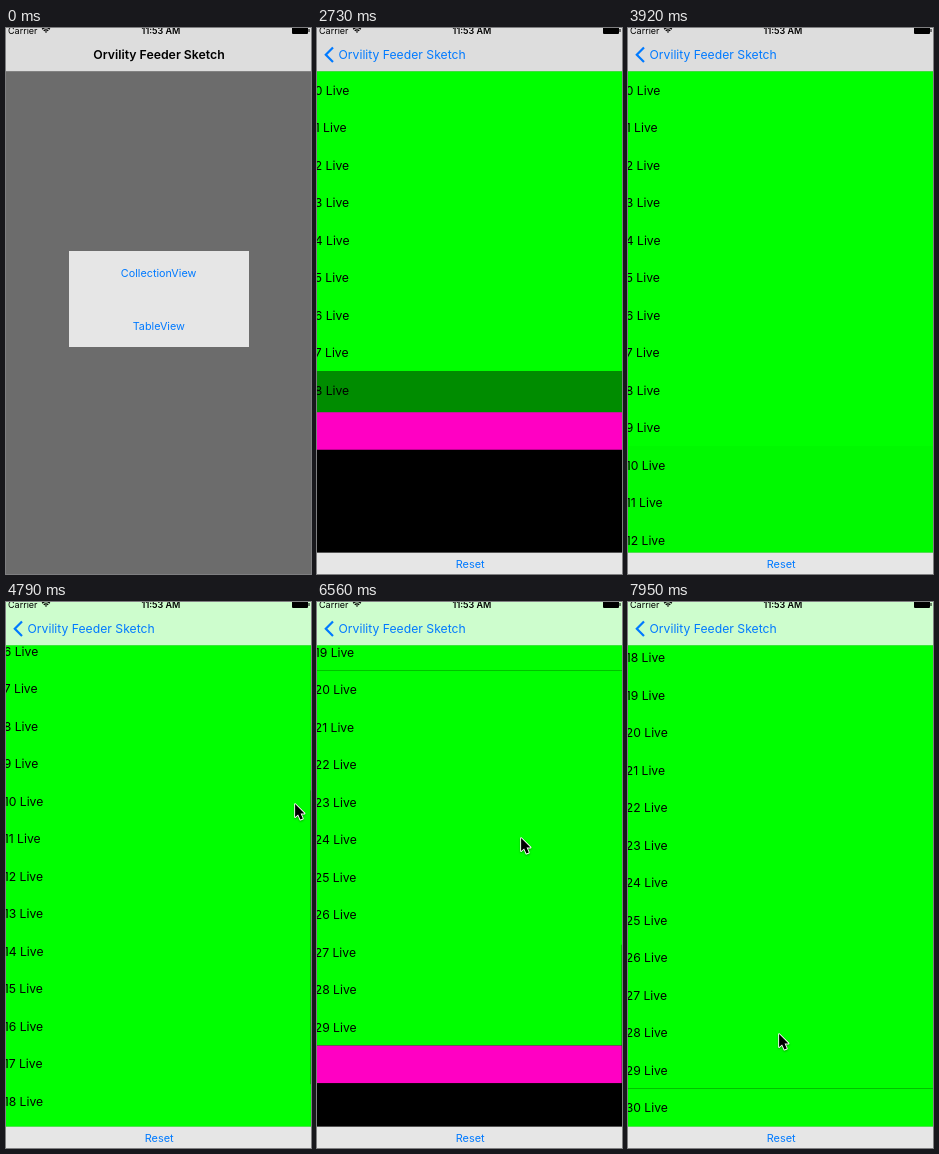
An HTML page with a canvas for the animation above (8 s loop, 305x546 px).

```html
<!DOCTYPE html>
<html lang="en">
<head>
<meta charset="utf-8">
<style>
  html, body { margin: 0; width: 100%; height: 100%; overflow: hidden; background: #000; }
  canvas { display: block; width: 305px; height: 546px; }
</style>
</head>
<body>
<canvas id="stage"></canvas>
<script>
const W = 305, H = 546, LOOP = 8000;
const TOP = 43, NAV = 43.3, BAR = 524.6, VIEW = 481, HAIRLINE = 0.3;
const ROW = 37.5, LEFT = -3.5, PANE = W + 10;
const BLUE = '#007aff', GREEN = '#00ff00', PINK = '#ff00c3';
const TITLE = 'Orvility Feeder Sketch';

const canvas = document.getElementById('stage');
const ctx = canvas.getContext('2d');
const ratio = window.devicePixelRatio || 1;
canvas.width = W * ratio;
canvas.height = H * ratio;

const clamp = v => Math.max(0, Math.min(1, v));
const mix = (a, b, p) => a + (b - a) * p;
const linear = p => p;
const smooth = p => p * p * (3 - 2 * p);
const easeIn = p => p * p;
const easeOut = p => 1 - (1 - p) ** 3;

// Keys are [time, values, easing used to arrive there].
function track(keys, t) {
  if (t <= keys[0][0]) return keys[0][1];
  for (let i = 1; i < keys.length; i++) {
    const [end, to, ease = smooth] = keys[i];
    const [start, from] = keys[i - 1];
    if (t < end) {
      const p = ease((t - start) / (end - start));
      return from.map((v, k) => mix(v, to[k], p));
    }
  }
  return keys[keys.length - 1][1];
}

const scrollKeys = [
  [4420, [0]],
  [4560, [55], easeIn],
  [4790, [238], linear],
  [5010, [338], easeOut],
  [5480, [306.5]],
  [5940, [306.5]],
  [6120, [400], easeIn],
  [6290, [610], linear],
  [6500, [725], easeOut],
  [7380, [681.5]]
];
const pointerKeys = [
  [960, [262, 400]],
  [1420, [164, 250]],
  [2120, [164, 250]],
  [4310, [291, 460]],
  [4420, [289, 440]],
  [4560, [289, 385], easeIn],
  [4790, [288, 201], linear],
  [4960, [284, 130], easeOut],
  [5120, [280, 130]],
  [5860, [214, 430]],
  [5940, [212, 430]],
  [6300, [203, 235]],
  [6740, [203, 235]],
  [7390, [160, 386]],
  [7560, [160, 386]],
  [7930, [150, 431]]
];
const loads = [[2570, 10], [3648, 20], [5880, 30], [7555, 40]];

function rect(x, y, w, h, color) {
  ctx.fillStyle = color;
  ctx.fillRect(x, y, w, h);
}

function text(str, x, y, size, color = '#000', align = 'left', weight = 400) {
  ctx.font = `${weight} ${size}px Inter, Roboto, sans-serif`;
  ctx.textAlign = align;
  ctx.fillStyle = color;
  ctx.fillText(str, x, y);
}

function faded(alpha, draw) {
  ctx.save();
  ctx.globalAlpha *= clamp(alpha);
  draw();
  ctx.restore();
}

function drawHome(t, push) {
  const shift = -94 * push;
  rect(0, TOP, W, H - TOP, '#6c6c6c');
  rect(63 + shift, 223, 180, 96, '#e6e6e6');
  const pressed = t > 1540;
  faded(pressed ? 0.27 : 1, () =>
    text('CollectionView', 152.6 + shift, 249, 10.8, BLUE, 'center'));
  text('TableView', 152.8 + shift, 301.5, 10.8, BLUE, 'center');
  rect(0, TOP, W, H - TOP, `rgba(0,0,0,${0.1 * push})`);
}

function drawList(t, x, scroll) {
  let settled = 8, total = 8, grow = 1;
  for (const [start, count] of loads) {
    if (t < start) break;
    settled = total;
    total = count;
    grow = smooth(clamp((t - start) / 300));
  }
  const top = TOP - scroll;
  const suffix = t < loads[0][0] ? ' Placeholder' : ' Live';

  rect(x, TOP, PANE, H - TOP, '#000');
  rect(x, top, PANE, settled * ROW, GREEN);
  faded(grow, () =>
    rect(x, top + settled * ROW, PANE, (total - settled) * ROW, GREEN));
  for (let i = 0; i < total; i++) {
    text(i + suffix, x + 1.2, top + i * ROW + 23.7, 12.2);
  }
  rect(x, top + mix(settled, total, grow) * ROW, PANE, ROW, PINK);
  drawIndicator(t, scroll, total);

  rect(x, BAR, PANE, H - BAR, '#e6e6e6');
  rect(x, BAR - HAIRLINE, PANE, HAIRLINE, 'rgba(0,0,0,.3)');
  text('Reset', x + 156.7, 540, 10.9, BLUE, 'center');
}

// The scroll mark gets shorter while the list is pulled past its end.
function drawIndicator(t, scroll, total) {
  const content = (total + 1) * ROW;
  const visible = Math.min(clamp((t - 4420) / 60), clamp((7390 - t) / 250));
  const excess = Math.max(0, scroll - (content - VIEW));
  const length = VIEW * VIEW / content - excess;
  const y = Math.min(TOP + scroll / content * VIEW, TOP + VIEW - length);
  faded(visible, () => rect(304, y, 1, length, 'rgba(0,0,0,.25)'));
}

function drawNav(push, scroll) {
  const tint = clamp(scroll / TOP);
  const side = mix(221, 205, tint), green = mix(221, 253, tint);
  rect(0, 0, W, NAV, `rgb(${side},${green},${side})`);
  rect(0, NAV, W, HAIRLINE, 'rgba(0,0,0,.3)');

  faded(1 - 2.4 * push, () =>
    text(TITLE, 153 - 50 * push, 31.2, 12.3, '#000', 'center', 600));
  faded((push - 0.35) / 0.65, () => {
    text(TITLE, mix(87, 21.5, push), 31.2, 12.2, BLUE);
    ctx.strokeStyle = BLUE;
    ctx.lineWidth = 2.2;
    ctx.beginPath();
    ctx.moveTo(16, 19.5);
    ctx.lineTo(8.8, 26.8);
    ctx.lineTo(16, 34.1);
    ctx.stroke();
  });
  drawStatus();
}

function drawStatus() {
  text('Carrier', 2, 6, 9);
  text('11:53 AM', 155, 6, 9, '#000', 'center', 600);
  ctx.strokeStyle = '#000';
  ctx.lineWidth = 1.3;
  for (const r of [1, 3.2, 5.4]) {
    ctx.beginPath();
    ctx.arc(40, 5, r, -Math.PI * 0.75, -Math.PI * 0.25);
    ctx.stroke();
  }
  ctx.fillStyle = '#000';
  ctx.beginPath();
  ctx.roundRect(286, -1, 16, 7, 1);
  ctx.fill();
  rect(302.5, 1, 1, 3, '#000');
}

function drawPointer(t) {
  if (t < 960 || (t > 2120 && t < 4310)) return;
  const [x, y] = track(pointerKeys, t);
  ctx.save();
  ctx.translate(x + 0.6, y + 0.6);
  ctx.beginPath();
  [[0.5, 0.5], [0.5, 13.5], [3.5, 10.8], [5.8, 16], [8.2, 15], [6, 9.9], [9.9, 9.9]]
    .forEach(point => ctx.lineTo(...point));
  ctx.closePath();
  ctx.shadowColor = 'rgba(0,0,0,.35)';
  ctx.shadowBlur = 2 * ratio;
  ctx.shadowOffsetY = ratio;
  ctx.lineWidth = 1.8;
  ctx.lineJoin = 'round';
  ctx.strokeStyle = '#fff';
  ctx.stroke();
  ctx.shadowColor = 'transparent';
  ctx.fillStyle = '#000';
  ctx.fill();
  ctx.restore();
}

// Critically damped spring for the screen change.
function pushProgress(t) {
  const s = Math.max(0, t - 1620) * 0.0182;
  return t > 2110 ? 1 : 1 - (1 + s) * Math.exp(-s);
}

function render(now) {
  const t = now % LOOP;
  const push = pushProgress(t);
  const [scroll] = track(scrollKeys, t);
  ctx.setTransform(ratio, 0, 0, ratio, 0, 0);
  if (push < 1) drawHome(t, push);
  if (push > 0) drawList(t, mix(307, LEFT, push), scroll);
  drawNav(push, scroll);
  drawPointer(t);
}

let begin;
function tick(now) {
  begin ??= now;
  render(now - begin);
  requestAnimationFrame(tick);
}
requestAnimationFrame(tick);
</script>
</body>
</html>
```
